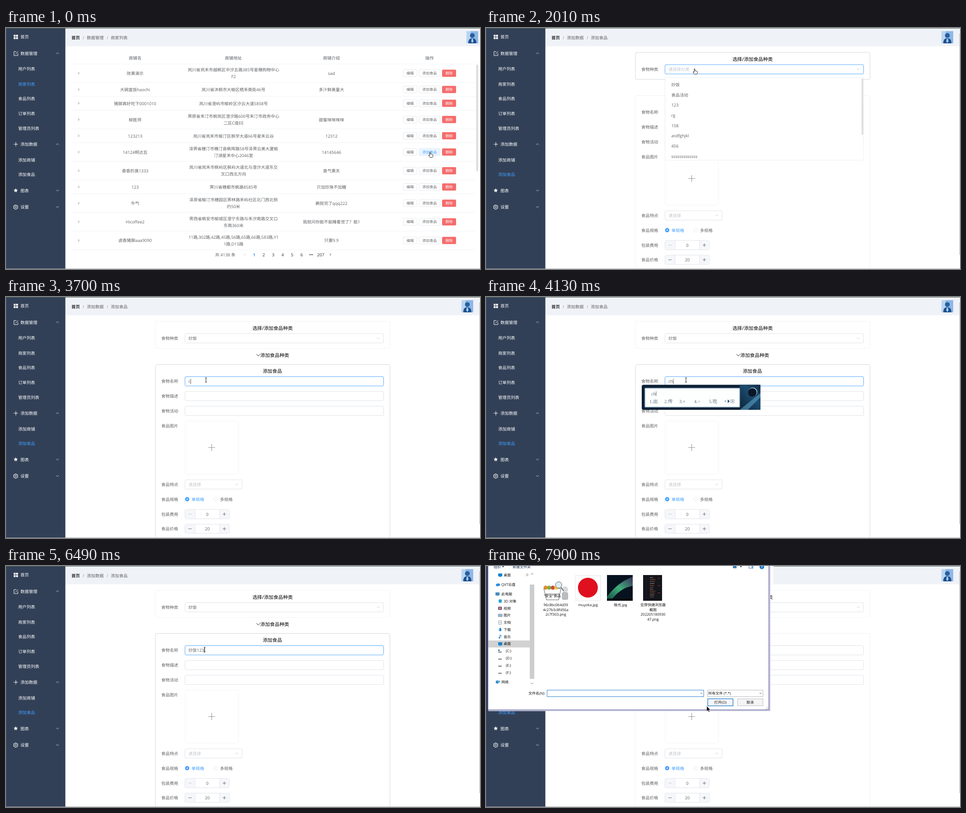
An HTML page for the animation above (8 s loop, 1050x534 px).

```html
<!DOCTYPE html>
<html lang="zh-CN">
<head>
<meta charset="utf-8">
<title>后台管理</title>
<style>
html, body { margin: 0; width: 100%; height: 100%; overflow: hidden; background: #fff; }
svg { display: block; }
text { font-family: "Open Sans", "Noto Sans CJK SC", "Noto Sans CJK", sans-serif; text-rendering: geometricPrecision; white-space: pre; }
.ime { font-family: "Liberation Serif", "Noto Sans CJK SC", "Noto Sans CJK", serif; }
</style>
</head>
<body>
<svg id="stage" width="1050" height="534" viewBox="0 0 1050 534"></svg>
<script>
const GREY = '#606266', BLUE = '#409eff', PALE = '#c0c4cc', LINE = '#dcdfe6', INK = '#303133';

// y is the vertical centre of the text
const T = (x, y, s, c = GREY, a = 'start', z = 9.33, more = '') =>
  `<text x="${x}" y="${(y + z * .36).toFixed(2)}" fill="${c}" text-anchor="${a}" font-size="${z}" ${more}>${s}</text>`;
const M = (x, y, s, c, z, more) => T(x, y, s, c, 'middle', z, more);
const R = (x, y, w, h, fill, stroke = 'none', r = 0, more = '') =>
  `<rect x="${x}" y="${y}" width="${w}" height="${h}" rx="${r}" fill="${fill}" stroke="${stroke}" ${more}/>`;
const P = (d, stroke, w = .9, fill = 'none', more = '') =>
  `<path d="${d}" stroke="${stroke}" stroke-width="${w}" fill="${fill}" ${more}/>`;
const C = (x, y, r, fill, stroke = 'none', more = '') =>
  `<circle cx="${x}" cy="${y}" r="${r}" fill="${fill}" stroke="${stroke}" ${more}/>`;
const G = (id, body, more = '') => `<g id="${id}" ${more}>${body}</g>`;
const down = (x, y, c, s = 3, w) => P(`M${x - s} ${y - s / 2}l${s} ${s}l${s} ${-s}`, c, w);
const up = (x, y, c, s = 3, w) => P(`M${x - s} ${y + s / 2}l${s} ${-s}l${s} ${s}`, c, w);
const right = (x, y, c, s = 2.4) => P(`M${x - s / 2} ${y - s}l${s} ${s}l${-s} ${s}`, c);
const left = (x, y, c, s = 2.4) => P(`M${x + s / 2} ${y - s}l${-s} ${s}l${s} ${s}`, c);

function sidebar() {
  const star = Array.from({ length: 10 }, (_, i) => {
    const r = i % 2 ? 2.3 : 5, a = i * Math.PI / 5;
    return `${21.5 + r * Math.sin(a)},${360 - r * Math.cos(a)}`;
  }).join(' ');
  let s = R(0, 0, 131.5, 534, '#324057');
  for (const dx of [0, 5.3]) for (const dy of [0, 5.3]) s += R(17 + dx, 15 + dy, 4.2, 4.2, '#fff');
  s += P('M23 52.3h-5.3v8.8h8.6v-5M21 58l6-6', '#fff', 1);
  s += P('M17 257.5h9.6M21.8 252.7v9.6', '#fff', 1);
  s += `<polygon points="${star}" fill="#fff"/>`;
  s += P('M21.5 391.9l4.3 2.5v5l-4.3 2.5l-4.3-2.5v-5z', '#fff', 1.1) + C(21.5, 396.9, 1.7, 'none', '#fff');
  const heads = { 首页: 20, 数据管理: 56.5, 添加数据: 258, 图表: 360.5, 设置: 397 };
  for (const k in heads) s += T(32, heads[k], k, '#fff');
  s += up(114, 56, '#cfd4dc') + up(114, 257.5, '#cfd4dc') + down(114, 360, '#cfd4dc') + down(114, 396.5, '#cfd4dc');
  const subs = { 用户列表: 91, 商家列表: 124.5, 食品列表: 157, 订单列表: 190, 管理员列表: 222.5, 添加商铺: 292.5, 添加食品: 325 };
  const ids = { 商家列表: 'id="navShop"', 添加食品: 'id="navFood"' };
  for (const k in subs) s += T(27, subs[k], k, '#fff', 'start', 9.33, ids[k] || '');
  return s;
}

const avatar = x => `<g transform="translate(${x} 7)">` +
  R(0, 0, 26, 27, '#8db8e6') + R(0, 0, 9, 27, '#b9d4f0') +
  P('M4 27c0-8 3-11 9-11s9 3 9 11z', 'none', 0, '#1d4f8f') + C(13, 9.5, 5.3, '#2a5f9e') +
  P('M11.5 17h3l1 6l-2.5 3l-2.500-3z', 'none', 0, '#a9cdf2') + '</g>';

const header = (a, b, x) => R(131.5, 0, 919, 40.5, '#eff2f7') +
  T(145, 21.5, '首页', INK, 'start', 9.33, 'font-weight="700"') + T(170, 21.5, '/', '#909399') +
  T(179, 21.5, a) + T(223, 21.5, '/', '#909399') + T(232, 21.5, b) + avatar(x);

const rows = [
  ['效果演示', '岚川省岚禾市越枫区中汐五路385号星穗购物中心|F2', 'sad'],
  ['大碗盒饭haochi', '岚川省沐枫市大榆区栖禾南街46号', '多汁鲜美量大'],
  ['猪脚真好吃下0001010', '岚川省澄屿市榆岭区汐云大道5858号', ''],
  ['柳医师', '霁原省禾汀市枫岚区澄汐路600号禾汀市政务中心|二区C座EE', '甜蜜咪咪咪咪'],
  ['123213', '岚川省岚禾市榆汀区枫学大道66号星禾云谷', '12312'],
  ['14124啊达瓦', '泽霁省穗汀市穗汀县枫晖路58号泽霁云美大厦榆|汀湖星禾中心2046室', '14145646'],
  ['香香的臭1333', '岚川省岚禾市枫屿区枫屿大道北与澄汐大道东交|叉口西北方向', '臭气熏天'],
  ['123', '霁川省穗都市枫路8585号', '只加珍珠不加糖'],
  ['牛气', '泽原省榆汀市穗园区霁林路禾屿社区北门西北侧|约50米', '齁就完了qqq222'],
  ['Hicoffee2', '霁西省枫安市榆城区澄宁东路与禾汐南路交叉口|东南360米', '我就问你能不能睡着觉了？能1'],
  ['卤香猪脚aaa9090', '11路,302路,42路,45路,56路,65路,66路,583路,Y1|1路,D15路', '只要9.9']
];

function listPage() {
  let s = header('数据管理', '商家列表', 1020), y = 79.5;
  ['商铺名', '商铺地址', '商铺介绍', '操作'].forEach((h, i) =>
    s += M(286 + i * 217.4, 67, h, '#909399', 9.33, 'font-weight="700"'));
  s += R(145, y, 895, .7, '#ebeef5');
  rows.forEach(([name, addr, intro], i) => {
    const lines = addr.split('|'), h = lines.length > 1 ? 41.3 : 30.7, m = y + h / 2, hot = i === 5;
    s += right(161, m, GREY) + M(286, m + .3, name) + M(721, m + .3, intro);
    lines.forEach((l, k) => s += M(504, m + .3 + (k - (lines.length - 1) / 2) * 15, l));
    s += R(880, m - 7.7, 30.5, 15.4, '#fff', LINE, 2, 'stroke-width=".7"') + M(895.2, m, '编辑', GREY, 8);
    s += R(915.3, m - 7.7, 46, 15.4, hot ? '#ecf5ff' : '#fff', hot ? '#c6e2ff' : LINE, 2, 'stroke-width=".7"') +
      M(938.3, m, '添加食品', hot ? BLUE : GREY, 8);
    s += R(966, m - 8, 31, 16, '#f56c6c', 'none', 2) + M(981.5, m, '删除', '#fff', 8);
    y += h;
    s += R(145, y - .4, 895, .7, '#ebeef5');
  });
  s += R(1041.5, 81, 4.5, 236, '#dcdde0', 'none', 2);
  s += M(485.7, 502.3, '共 4138 条') + left(529, 502, PALE) + right(718.5, 502, INK);
  s += M(550, 502.3, '1', BLUE, 9.33, 'font-weight="700"');
  for (let n = 2; n < 7; n++) s += M(529 + n * 21, 502.3, n, INK);
  for (let k = -1; k < 2; k++) s += C(676 + k * 3, 502.3, 1.1, INK);
  return s + M(697, 502.3, '207', INK);
}

const field = (y, id = '') => R(396.5, y, 440, 20.6, '#fff', LINE, 2.5, `stroke-width=".9" ${id}`);

function number(y, v, minus) {
  return R(396.5, y, 98.7, 20.6, '#fff', LINE, 2.5, 'stroke-width=".9"') +
    R(397, y + .5, 21.6, 19.6, '#f5f7fa') + R(473.200, y + .5, 21.6, 19.6, '#f5f7fa') +
    P(`M418.7 ${y}v20.6M473 ${y}v20.6`, LINE, .8) +
    P(`M404 ${y + 10.3}h7.4`, minus) + P(`M480 ${y + 10.3}h7.4M483.700 ${y + 6.6}v7.4`, GREY) +
    M(446, y + 10.5, v);
}

function formPage() {
  let s = header('添加数据', '添加食品', 1009) + R(1048.6, 12, 1.4, 491, '#c4c6ca');
  s += R(331, 54, 519.500, 60, '#fff', '#f0f1f5', 4, 'id="card1" stroke-width=".9"');
  s += R(331, 149.5, 519.500, 400, '#fff', '#f0f1f5', 4, 'id="card2" stroke-width=".9"');
  s += M(590.5, 68.7, '选择/添加食品种类', '#000', 10.67) + field(81.2, 'id="select"');
  s += T(404, 91.7, '', PALE, 'start', 9.33, 'id="kind"') + G('chev', up(0, 0, PALE));
  s += down(558.8, 128.8, '#000', 4) + T(563.3, 129.3, '添加食品种类', '#000', 'start', 10.67);
  s += M(590, 163.7, '添加食品', '#000', 10.67);
  const labels = { 食物种类: 91.7, 食物名称: 187, 食物描述: 219.800, 食物活动: 252.7, 食品图片: 285.700,
    食品特点: 415.5, 食品规格: 448.2, 包装费用: 481.2, 食品价格: 513.7 };
  for (const k in labels) s += T(344, labels[k], k);
  s += field(176.5, 'id="nameBox"') + field(209.3) + field(242);
  s += T(404, 187, '', GREY, 'start', 9.33, 'id="name"') + R(0, 181, .8, 12, '#333', 'none', 0, 'id="caret"');
  s += R(396.8, 275, 118, 117.500, '#fff', '#dfe1e6', 4, 'stroke-width=".7" stroke-dasharray="2 1.5"');
  s += P('M448 333.500h15.200M455.6 326v15.200', '#8c939d', 1.1);
  s += R(396.5, 405, 126.5, 20.6, '#fff', LINE, 2.5, 'stroke-width=".9"') + T(404, 415.5, '请选择', PALE) + down(511, 415.3, PALE);
  s += C(401.3, 448, 4.7, BLUE) + C(401.3, 448, 1.4, '#fff') + T(411, 448.2, '单规格', BLUE);
  s += C(464.5, 448, 4.3, '#fff', LINE, 'stroke-width=".8"') + T(474, 448.2, '多规格');
  return s + number(470.8, 0, PALE) + number(503.3, 20, GREY);
}

function dropdown() {
  let s = R(0, 0, 440, 183, '#fff', '#e4e7ed', 2.5, 'stroke-width=".7"');
  s += R(1, 4, 438, 22.67, '#f5f7fa', 'none', 0, 'id="hot"');
  ['炒饭', '食品活动', '123', 'rg', '158', 'asdfghjkl', '456', 'sssssssssssss'].forEach((v, i) =>
    s += T(14, 15.5 + i * 22.67, v, GREY, 'start', 9.33, i ? '' : 'id="first"'));
  return s + R(435.5, 2, 3.5, 125, '#dcdde0', 'none', 1.7);
}

const words = {
  c: '从 成功 参加 出来 才能', ch: '出 传 × ÷ 吃', cha: '查 差 茶 叉 插', chao: '炒 超级 炒饭 超市 潮流',
  chaof: '炒饭 炒粉 超凡 朝服 超赞', chaofan: '炒饭 超凡 炒翻 抄范 吵'
};

// candidate window; its width follows the word lengths
function imeBox(typed) {
  let x = 362, s = '';
  words[typed].split(' ').forEach((w, i) => {
    s += T(x, 231, `${i + 1}.${w}`, '#5b6f80', 'start', 10.5, 'class="ime"');
    x += 33 + (w.length - 1) * 10.5;
  });
  const end = x + 81, p = end - 46;
  return R(345, 194.500, end - 345, 55.5, '#0c2136', 'none', 4) +
    R(p, 194.500, 46, 55.5, 'url(#sky)') +
    P(`M${p} 250L${end} 213v9L${p + 18} 250z`, 'none', 0, '#5fa8cf', 'opacity=".55"') +
    C(end - 17, 210.5, 10, '#9fc4dc') + C(end - 18, 211.5, 9.5, '#0a1626') +
    R(352, 202, p - 352, 42, '#fdfefe', '#8fa9bd', 1, 'stroke-width="1.5"') + s +
    T(366, 214, typed, '#5b6f80', 'start', 10.5, 'class="ime"') +
    R(366.5 + typed.length * 5, 209, .8, 10, '#333') +
    P(`M${x + 4.500} 228v6l-3.5-3z`, 'none', 0, '#9aa9b5') + P(`M${x + 8.5} 227v8l4.500-4z`, 'none', 0, '#2d4a60') +
    R(x + 15.5, 227.5, 7, 7, '#fff', '#7e93a3', 0, 'stroke-width=".8"') + P(`M${x + 17} 230h4l-2 2.500z`, 'none', 0, '#456');
}

function dialog() {
  const K = '#111', t = (x, y, s) => T(x, y, s, K, 'start', 8), m = (x, y, s) => M(x, y, s, K, 8);
  let s = R(627, 0, 10, 40.500, '#fbfbfe') + R(5, -20, 625, 341.500, '#c9c8dc', 'none', 1) +
    R(4.5, -20, 622, 338.7, '#fff', '#7471ad', 0, 'stroke-width="1.2"');
  s += T(17, 2, '组织', '#1e395b', 'start', 8) + T(59, 2, '新建文件夹', '#1e395b', 'start', 8) + P('M35.500 0.500h4.500l-2.200 2.500z', 'none', 0, K);
  s += R(547, -2, 8, 7, '#3c7fb8') + P('M562.500 .5h4.500l-2.200 2.500z', 'none', 0, K) +
    R(582.500, -2, 9, 7, '#fff', '#4b79a8') + R(588, -2, 3.500, 7, '#78b4e8') + C(611, 2, 5, '#1673c8') + M(611, 2, '?', '#fff', 8, 'font-weight="700"');
  s += R(5.2, 165, 92, 15.500, '#d2d2d2') + R(97, 41, 10, 209, '#cdcdcd') + up(102, 17.500, '#555', 2.500) + down(102, 260, '#555', 2.500);
  s += P('M88 23l2.500-2.500M89 18.500l3.500 3.500M91 16.500l3 3l-2 1l-2-2z', '#888', .8);
  const disk = y => R(27, y, 8, 2.400, '#8b9096', 'none', 1) + R(27, y - 1.500, 7, 1.500, '#d2d5d8');
  const screen = (x, y, c) => R(x, y - 3.500, 9, 6.500, c) + R(x + 2.500, y + 3.400, 4, 1, c);
  [20, 172.500].forEach(y => s += screen(27, y, '#1482cc') + t(39, y, '桌面'));
  s += C(25, 42, 3, '#2f8de0') + C(28, 41.500, 3, '#2f8de0') + t(34, 41.500, 'QVT云盘') + screen(21, 62, '#4a8ab8') + t(34, 62.300, '此电脑');
  ['3D 对象', '视频', '图片', '文档', '下载', '音乐'].forEach((v, i) => {
    const y = 78 + i * 15.750;
    s += t(39, y, v);
    s += [R(28, y - 4, 7, 7.500, '#2ba3d4', 'none', 2), R(27, y - 3.500, 8, 7, '#6b4a7d') + R(29, y - 2, 4, 4, '#d6925c'),
      R(27, y - 3, 9, 6, '#8fb9d8', '#888', 0, 'stroke-width=".6"'), R(28, y - 4, 6.500, 8, '#fff', '#7b93a8', 0, 'stroke-width=".8"') + P(`M29.500 ${y - 1}h4m-4 2h4`, '#7b93a8', .7),
      P(`M30 ${y - 4}h3v4h2.500l-4 4l-4-4h2.500z`, 'none', 0, '#1979ca'), P(`M31 ${y + 2}v-6q3 1 3 4`, '#1979ca', 1.1) + C(29.700, y + 2.300, 1.700, '#1979ca')][i];
  });
  ['C', 'D', 'E', 'F'].forEach((v, i) => s += disk(189.500 + i * 15.800) + t(44, 188.500 + i * 15.800, `(${v}:)`));
  s += R(27, 185, 3, 3, '#1979ca') + C(25, 257, 3.500, '#2f8dc8') + R(26, 254, 5, 4, '#64a9d8') + t(34, 256.700, '网络');
  // thumbnails
  s += P('M128 50h38l-5 25h-27z', '#333', .8, '#fff') + P('M131 62h32', '#333', .8);
  [['#e58a2f', 132], ['#78b642', 140], ['#d8473d', 148], ['#f1cf45', 156]].forEach(([c, x]) => s += C(x, 48, 4.500, c));
  s += C(175, 52, 7, '#d9dadc') + R(168, 58, 14, 17, '#b9bcc0', 'none', 4) + C(161, 42, 7, '#dceef8', '#555') + P('M166 47l6 8', '#555', 1.500) + m(147, 66, '“安全”食品');
  s += R(198, 21, 55.500, 56, '#fff', '#ddd', 0, 'stroke-width=".8"') + C(225.700, 48, 22, '#e0101e');
  s += R(268, 20, 57, 57, '#07121f') + P('M268 68Q292 36 325 24V44Q298 48 276 77H268z', 'none', 0, 'url(#glow)') + R(268, 72, 57, 5, '#04090f');
  s += R(348, 20, 42, 57, '#15151c');
  for (let i = 0; i < 11; i++) s += R(363, 25 + i * 4.300, 7 + i * 5 % 6, 1, i % 3 ? '#a8643c' : '#9a9aa0') + (i % 4 ? '' : R(381, 27 + i * 4, 4, 1, '#c33'));
  const names = [[154.500, '96c8bc064d39|4c27b3c8fd56a|2c7f303.png'], [226, 'muyoka.jpg'], [298, '极光.jpg'], [370, '豆芽快捷浏览器|截图|202205180930|47.png']];
  names.forEach(([x, n]) => n.split('|').forEach((l, i) => s += m(x, 86.500 + i * 10.500, l)));
  s += T(131, 282, '文件名(N):', K, 'end', 8) + R(135.300, 275, 347, 14.500, '#fff', '#2b82cf') + down(477, 282, '#444', 2);
  s += R(490.500, 275, 123, 14.500, '#fff', '#a5a5a5', 0, 'stroke-width=".8"') + t(492.500, 282, '所有文件 (*.*)') + down(608, 282, '#444', 2);
  s += R(491.200, 294.300, 56, 15.500, '#f4f5f7', '#1d78c9', 0, 'stroke-width="1.300"') + m(519.300, 302, '打开(O)');
  s += R(557, 294.300, 56.500, 15.500, '#f4f4f6', '#adadad', 0, 'stroke-width=".8"') + m(585, 302, '取消');
  for (let i = 0; i < 3; i++) for (let k = 0; k <= i; k++) s += R(623.500 - k * 2.300, 312 + i * 2.300, 1.200, 1.200, '#999');
  return s;
}

const cursors =
  G('arrow', P('M0 0v11.500l2.700-2.500l1.900 4.200l1.700-.8l-1.900-4h3.600z', '#fff', .5, '#000')) +
  G('hand', P('M-.9 .8q.9-1.600 1.800 0v4.200q1.300-.9 1.900 .3q1.300-.6 1.800 .5q1.600-.3 1.600 1.200v2.400q-.5 2-1.300 2.900h-5l-3.200-4.200q0-1.600 1.400-1l1 1z', '#111', .9, '#fff')) +
  G('beam', P('M-2 -5h1.500l.5.500l.5-.5h1.500M0 -4.500v9M-2 5h1.500l.5-.5l.5.500h1.500', '#111', 1));

stage.innerHTML = `<defs>
  <linearGradient id="sky" x1="0" y1="1" x2="1" y2="0"><stop offset="0" stop-color="#0c2136"/><stop offset=".6" stop-color="#1c4c70"/><stop offset="1" stop-color="#0f2a42"/></linearGradient>
  <linearGradient id="glow" x1="0" y1="1" x2="1" y2="0"><stop offset="0" stop-color="#0f4a3c"/><stop offset=".5" stop-color="#3fae7a"/><stop offset="1" stop-color="#3a2f5c"/></linearGradient>
</defs>` + R(0, 0, 1050, 534, '#fff') + G('list', listPage()) + G('form', formPage()) + sidebar() +
  G('drop', dropdown()) + G('ime', '') +
  R(0, 0, 1050, 1, '#4d6b57') + R(0, 533, 1050, 1, '#a3aaa8') + R(0, 0, .8, 534, '#46557a') +
  G('dlg', dialog()) + G('cursor', cursors);

const start = { form: 0, cur: 'hand', x: 939.5, y: 274.5, shop: BLUE, food: '#fff', card: 0, select: 0, kind: '',
  drop: 0, turn: 180, hot: 0, name: '', focus: 0, caret: 0, ime: '', dlg: 0 };
const at = (x, y, more) => ({ x, y, ...more });
const type = s => ({ name: s, ime: s, caret: 1 });
const steps = [
  [0, {}],
  [120, at(940.5, 272.5, { cur: 'arrow' })],
  [800, { form: 1 }],
  [1070, { shop: '#a0cfff', food: '#a0cfff' }],
  [1200, { shop: '#fff', food: BLUE }],
  [1360, at(890, 235)],
  [1560, at(640, 125)],
  [1710, at(480, 92, { cur: 'hand', card: 1 })],
  [1860, at(462, 90, { select: 1, drop: .7, turn: 45 })],
  [2000, { drop: 1, turn: 0 }],
  [2150, at(461, 104, { card: 0 })],
  [2290, at(461, 120, { hot: 1 })],
  [2440, at(461.5, 125)],
  [2580, { kind: '炒饭' }],
  [2730, { drop: .47, turn: 45, hot: 0 }],
  [2880, at(461, 128, { drop: 0, turn: 180, cur: 'arrow' })],
  [3000, at(455, 160, { card: 2, select: 0 })],
  [3150, at(443, 184, { cur: 'beam' })],
  [3300, { focus: 1, caret: 1 }],
  [3700, { name: 'c' }],
  [3820, type('c')],
  [4130, type('ch')],
  [4250, type('cha')],
  [4370, type('chao')],
  [4650, type('chaof')],
  [4800, type('chaofan')],
  [5110, { name: '炒饭', ime: '', caret: 0 }],
  [5260, { caret: 1 }],
  [5790, { caret: 0 }],
  [6190, { name: '炒饭1', caret: 1 }],
  [6340, { name: '炒饭12' }],
  [6490, at(440, 185, { name: '炒饭123' })],
  [6640, at(441, 190)],
  [6790, at(455, 232, { cur: 'arrow' })],
  [6900, at(473, 275, { cur: 'hand' })],
  [7050, at(487, 306)],
  [7180, at(489, 310.5, { focus: 0, caret: 0 })],
  [7330, { cur: 'arrow', card: 0 }],
  [7750, { dlg: .5 }],
  [7900, { dlg: 1 }]
];
let prev = start;
const states = steps.map(([, change]) => prev = { ...prev, ...change });

const $ = id => document.getElementById(id);
const set = (id, attrs) => { for (const k in attrs) $(id).setAttribute(k, attrs[k]); };
const show = (id, on) => $(id).style.display = on ? '' : 'none';

function draw(s) {
  show('list', !s.form);
  show('form', s.form);
  set('navShop', { fill: s.shop });
  set('navFood', { fill: s.food });
  [1, 2].forEach(n => set('card' + n, { stroke: s.card === n ? '#cfd2d8' : '#f0f1f5' }));
  set('select', { stroke: s.select ? BLUE : LINE });
  set('nameBox', { stroke: s.focus ? BLUE : LINE });
  set('kind', { fill: s.kind ? GREY : PALE });
  $('kind').textContent = s.kind || '请选择分类';
  set('chev', { transform: `translate(824.5 91.5) rotate(${s.turn})` });
  $('name').textContent = s.name;
  show('caret', s.caret);
  if (s.form) set('caret', { x: 404.3 + (s.name ? $('name').getComputedTextLength() : 0) });
  show('drop', s.drop);
  set('drop', { transform: `translate(396.5 110) scale(1 ${s.drop || 1})`, opacity: s.drop });
  show('hot', s.hot);
  set('first', { fill: s.kind ? BLUE : GREY, 'font-weight': s.kind ? 700 : 400 });
  $('ime').innerHTML = s.ime && imeBox(s.ime);
  show('dlg', s.dlg);
  set('dlg', { opacity: s.dlg });
  set('cursor', { transform: `translate(${s.x} ${s.y})` });
  ['arrow', 'hand', 'beam'].forEach(c => show(c, c === s.cur));
}

let shown = -1;
function tick() {
  const t = performance.now() % 8000;
  let i = steps.length - 1;
  while (steps[i][0] > t) i--;
  if (i !== shown) draw(states[shown = i]);
  requestAnimationFrame(tick);
}
tick();
</script>
</body>
</html>
```
